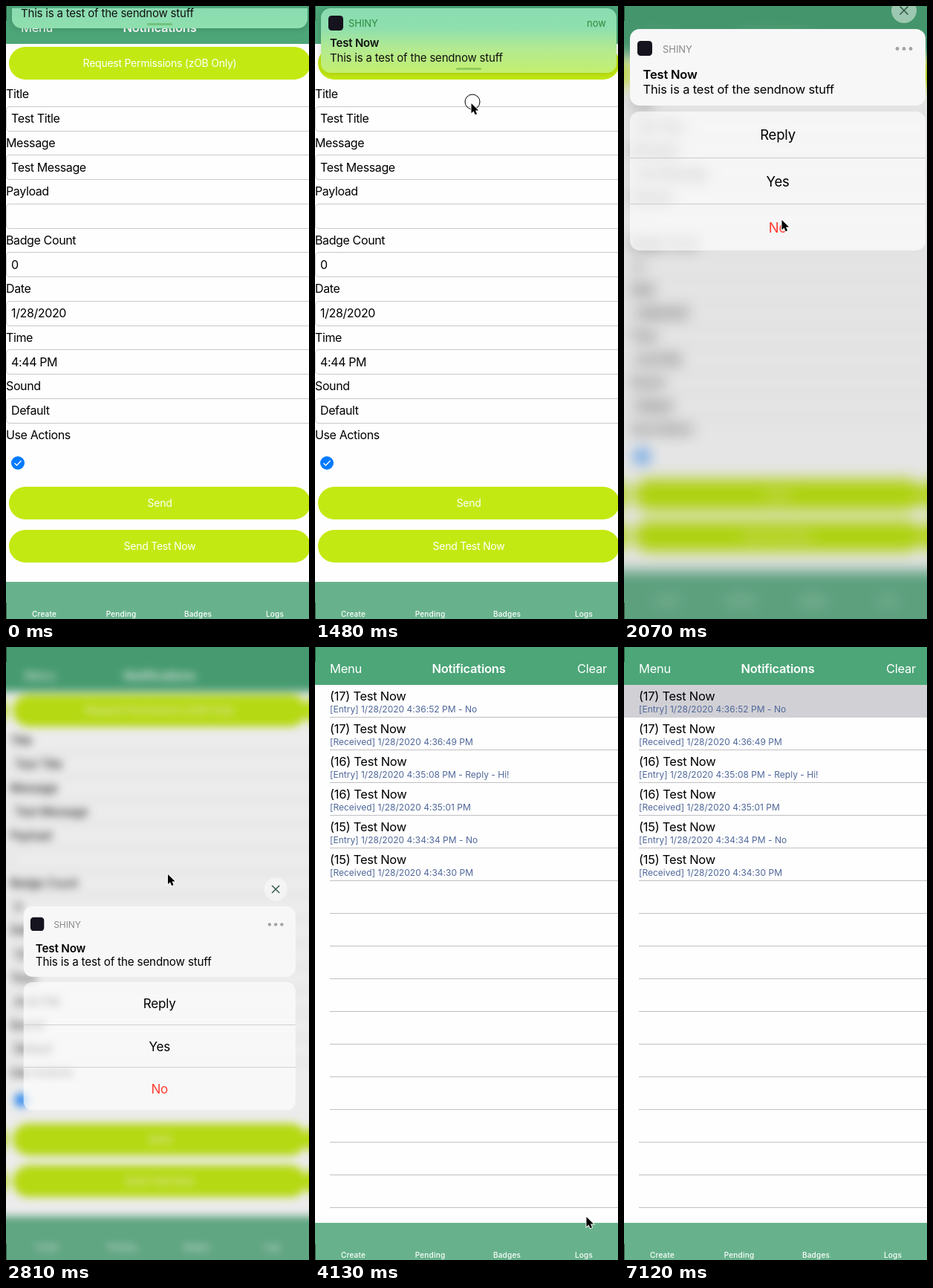
Animation, 408 px wide and 825 px high, one loop 7.22 s. Source, as an HTML page:

```html
<!DOCTYPE html>
<html lang="en">
<head>
<meta charset="utf-8">
<title>Notification demo</title>
<style>
html, body { margin: 0; width: 100%; height: 100%; overflow: hidden; background: #fefefe; }
#stage { position: absolute; left: 0; top: 0; width: 408px; height: 825px; overflow: hidden; background: #fefefe;
  font: 16px/24px Inter, sans-serif; letter-spacing: -.38px; color: #000; }
#stage div, #stage svg { position: absolute; box-sizing: border-box; white-space: nowrap; }
#page, #form, #log { left: 0; top: 0; width: 408px; height: 825px; }
#page { transform-origin: 204px 412px; }
#stage .paper { left: -80px; right: -80px; top: -80px; bottom: -80px; background: #fefefe; }
.bar { left: -80px; right: -80px; }
#nav { top: -80px; height: 131px; background: #4ca678; }
#tabs { top: 775px; height: 130px; background: #67b28c; }
.mid { transform: translateX(-50%); }
.nav { font-size: 16.5px; letter-spacing: -.25px; color: #fff; }
.bold { font-weight: 600; }
.tab { font-size: 10px; font-weight: 500; letter-spacing: .2px; color: #fff; }
.field { left: 0; width: 430px; height: 34px; border: 1px solid #c9c9c9; border-radius: 5px; }
/* The shadows mirror each button past the screen edges, seen only when blurred */
.button { left: 4px; width: 406px; height: 44px; border-radius: 22px; background: #c3e913; color: #fff;
  box-shadow: -414px 0 #c3e913, 404px 0 #c3e913;
  font-size: 14px; line-height: 44px; text-align: center; letter-spacing: -.25px; }
.entry { font-size: 16.5px; letter-spacing: -.27px; }
.detail { font-size: 12px; letter-spacing: .02px; color: #4f679a; }
.line { left: 20px; width: 388px; height: 1px; background: #c0c0c2; }
#picked { left: 0; top: 51px; width: 408px; height: 44px; background: #d1d0d5; }
#banner { left: 8px; top: 3px; width: 398px; height: 87px; border-radius: 13px; box-shadow: 0 1px 10px rgba(0,0,0,.16);
  background: linear-gradient(#8adcb1, #8fdfae 27px, #b4ea90 55px, #c5f069 92px) no-repeat 0 0 / 100% 150px; }
.logo { width: 20px; height: 20px; border-radius: 4.5px; background: #15131d; }
.small { font-size: 13px; letter-spacing: -.05px; }
.text15 { font-size: 15px; letter-spacing: -.2px; color: #111; }
.text16 { font-size: 16.5px; letter-spacing: -.18px; }
.action { font-size: 18.5px; letter-spacing: -.2px; }
#card { left: 0; top: 0; width: 408px; height: 340px; transform-origin: 204px 6px; }
.sheet { left: 8px; width: 398px; border-radius: 13px; }
.rule { left: 8px; width: 398px; height: 1px; background: #cbcbcb; }
.edge { left: 0; width: 1px; background: rgba(0,0,0,.45); }
</style>
</head>
<body>
<div id="stage">
  <div id="page">
    <div class="paper"></div>
    <div id="form"></div>
    <div id="log"><div id="picked"></div></div>
    <div id="nav" class="bar"></div>
    <div id="tabs" class="bar"></div>
  </div>
  <div id="banner">
    <div class="logo" style="left:10px;top:10px"></div>
    <div style="left:182px;top:80px;width:34px;height:3px;border-radius:2px;background:rgba(70,150,50,.4)"></div>
  </div>
  <div id="card">
    <div class="sheet" style="top:31px;height:103px;background:#f7f7f7"></div>
    <div class="sheet" style="top:142px;height:187px;background:rgba(255,255,255,.65)"></div>
    <div class="rule" style="top:204px"></div>
    <div class="rule" style="top:266px"></div>
    <div class="logo" style="left:18px;top:47px"></div>
    <svg width="408" height="70" style="left:0;top:-20px;overflow:visible">
      <circle cx="377" cy="26" r="17" fill="#fff" fill-opacity=".47"/>
      <path d="M371.500 20.500l11 11m0-11l-11 11" stroke="#35584a" stroke-width="1.600"/>
      <g fill="#a3a3a3"><circle cx="368" cy="77.500" r="2.400"/><circle cx="377" cy="77.500" r="2.400"/><circle cx="386" cy="77.500" r="2.400"/></g>
    </svg>
  </div>
  <div class="edge" style="top:0;height:20px"></div>
  <div class="edge" style="top:803px;height:22px"></div>
  <svg id="cursor" width="30" height="30" style="left:0;top:0;overflow:visible">
    <circle id="press" cx="2" cy="-1" r="10" fill="none" stroke="#000"/>
    <path d="M0 0v14.800l3.400-3.100 2.300 5.200 2.700-1.200-2.300-5.100h4.600z" transform="translate(.5 1) scale(.9)" stroke="#fff" stroke-width="2" paint-order="stroke"/>
  </svg>
</div>
<script>
const $ = id => document.getElementById(id);

function box(parent, cls, top, content = '') {
  const el = document.createElement('div');
  el.className = cls;
  el.style.top = top + 'px';
  el.textContent = content;
  $(parent).append(el);
  return el;
}
// Text whose capitals are centred on cy
function text(parent, x, cy, content, cls = '', color = '') {
  const el = box(parent, cls, cy - 12, content);
  el.style.left = x + 'px';
  el.style.color = color;
}

const fields = [['Title', 'Test Title'], ['Message', 'Test Message'], ['Payload', ''], ['Badge Count', '0'],
  ['Date', '1/28/2020'], ['Time', '4:44 PM'], ['Sound', 'Default'], ['Use Actions']];
fields.forEach(([label, value], i) => {
  const y = 65.5 * i;
  text('form', 0, 118 + y, label);
  if (value === undefined) return;
  box('form', 'field', 134.5 + y);
  text('form', 7, 151 + y, value);
});
box('form', 'button', 55, 'Request Permissions (zOB Only)');
box('form', 'button', 647, 'Send');
box('form', 'button', 705, 'Send Test Now');
$('form').insertAdjacentHTML('beforeend', `<svg width="18" height="18" style="left:7px;top:606px">
  <circle cx="9" cy="9" r="9" fill="#007aff"/><path d="M4.500 9.300l3 3 6-6.300" fill="none" stroke="#fff" stroke-width="1.300"/></svg>`);

for (let i = 0; i < 16; i++) {
  const line = box('log', 'line', 94 + 44 * i);
  if (i === 0) line.id = 'firstLine';
}
const entries = ['[Entry] 1/28/2020 4:36:52 PM - No', '[Received] 1/28/2020 4:36:49 PM',
  '[Entry] 1/28/2020 4:35:08 PM - Reply - Hi!', '[Received] 1/28/2020 4:35:01 PM',
  '[Entry] 1/28/2020 4:34:34 PM - No', '[Received] 1/28/2020 4:34:30 PM'];
entries.forEach((detail, i) => {
  text('log', 20, 66 + 44 * i, `(${17 - (i >> 1)}) Test Now`, 'entry');
  text('log', 20, 84 + 44 * i, detail, 'detail');
});

text('page', 20, 29, 'Menu', 'nav');
text('page', 207, 29, 'Notifications', 'nav bold mid');
text('page', 353, 29, 'Clear', 'nav');
const clear = $('page').lastChild;
['Create', 'Pending', 'Badges', 'Logs'].forEach((name, i) => text('page', 51.5 + 103.5 * i, 817.5, name, 'tab mid'));

text('banner', 37, 20, 'SHINY', 'small', '#2b8a3e');
text('banner', 358, 20, 'now', 'small', '#2b8a3e');
text('banner', 12, 47, 'Test Now', 'text15 bold');
text('banner', 12, 67, 'This is a test of the sendnow stuff', 'text15');

text('card', 52, 58, 'SHINY', 'small', '#8a8a8a');
text('card', 25.5, 91.5, 'Test Now', 'text16 bold');
text('card', 25.5, 112, 'This is a test of the sendnow stuff', 'text16');
text('card', 207, 173, 'Reply', 'action mid');
text('card', 207, 235.5, 'Yes', 'action mid');
text('card', 207, 298, 'No', 'action mid', '#ff3b30');

// Tracks: [step, values...], linear between steps
const bannerTrack = [[0, -60], [1, -28], [2, -8], [3, 0], [10, 0], [11, 14]];
const cardTrack = [[12, 24, .95], [13, 4, 1], [14, 0, 1], [17, 0, 1], [18, 30, .98], [19, 320, .92], [21, 812, .908]];
const pageTrack = [[10, 1, 0, 1], [11, .99, 2, .97], [13, .957, 10, .9], [18, .957, 10, .9],
  [19, .975, 6, .93], [20, .99, 2.5, .97], [21, .997, .8, .99], [22, 1, 0, 1]];
const cursorTrack = [[3, 232, 528], [6, 214, 140], [7, 211, 80], [8, 211, 64], [9, 210, 78], [10, 210, 130], [11, 211, 172],
  [14, 212, 287], [18, 213, 290], [20, 222, 320], [21, 237, 373], [23, 335, 700], [24, 364, 803], [27, 364, 803],
  [28, 365, 766], [31, 270, 330], [33, 205, 120], [34, 201, 95], [35, 200, 88], [41, 200, 88], [42, 228, 300], [43, 277, 693]];
const presses = [9, 10, 11, 15, 26, 35];

function sample(track, n) {
  const i = track.findIndex(key => key[0] >= n);
  if (i < 0) return track.at(-1).slice(1);
  if (i === 0) return track[0].slice(1);
  const [a, b] = [track[i - 1], track[i]];
  const k = (n - a[0]) / (b[0] - a[0]);
  return a.slice(1).map((v, j) => v + (b[j + 1] - v) * k);
}
const show = (el, on) => { el.style.display = on ? '' : 'none'; };

// The picture moves in steps of about 147 ms, later 150 ms
const stepStart = n => n < 33 ? Math.round(14.74 * n + .3) * 10 : 4870 + 150 * (n - 33);
function stepAt(ms) {
  let n = 0;
  while (stepStart(n + 1) <= ms) n++;
  return n;
}

function draw(n) {
  const logs = n >= 27, picked = n >= 35;
  show($('form'), !logs);
  show($('log'), logs);
  show(clear, logs);
  show($('picked'), picked);
  show($('firstLine'), !picked);

  const [zoom, blur, light] = sample(pageTrack, n);
  $('page').style.transform = zoom < 1 ? `scale(${zoom})` : '';
  $('page').style.filter = blur ? `blur(${blur}px) brightness(${light})` : '';

  // The tint belongs to the screen, so it shifts against the banner
  const [drop] = sample(bannerTrack, n);
  show($('banner'), n < 12);
  $('banner').style.transform = `translateY(${drop}px)`;
  $('banner').style.backgroundPositionY = `${-drop}px`;

  const [fall, size] = sample(cardTrack, n);
  show($('card'), n >= 12 && n < 22);
  $('card').style.transform = `translateY(${fall}px) scale(${size})`;

  const [x, y] = sample(cursorTrack, n);
  show($('cursor'), n >= 3 && n < 44);
  $('cursor').style.transform = `translate(${x}px, ${y}px)`;
  show($('press'), presses.includes(n));
}

let shown = -1;
function tick() {
  const n = stepAt(performance.now() % 7220);
  if (n !== shown) draw(shown = n);
  requestAnimationFrame(tick);
}
tick();
</script>
</body>
</html>
```
